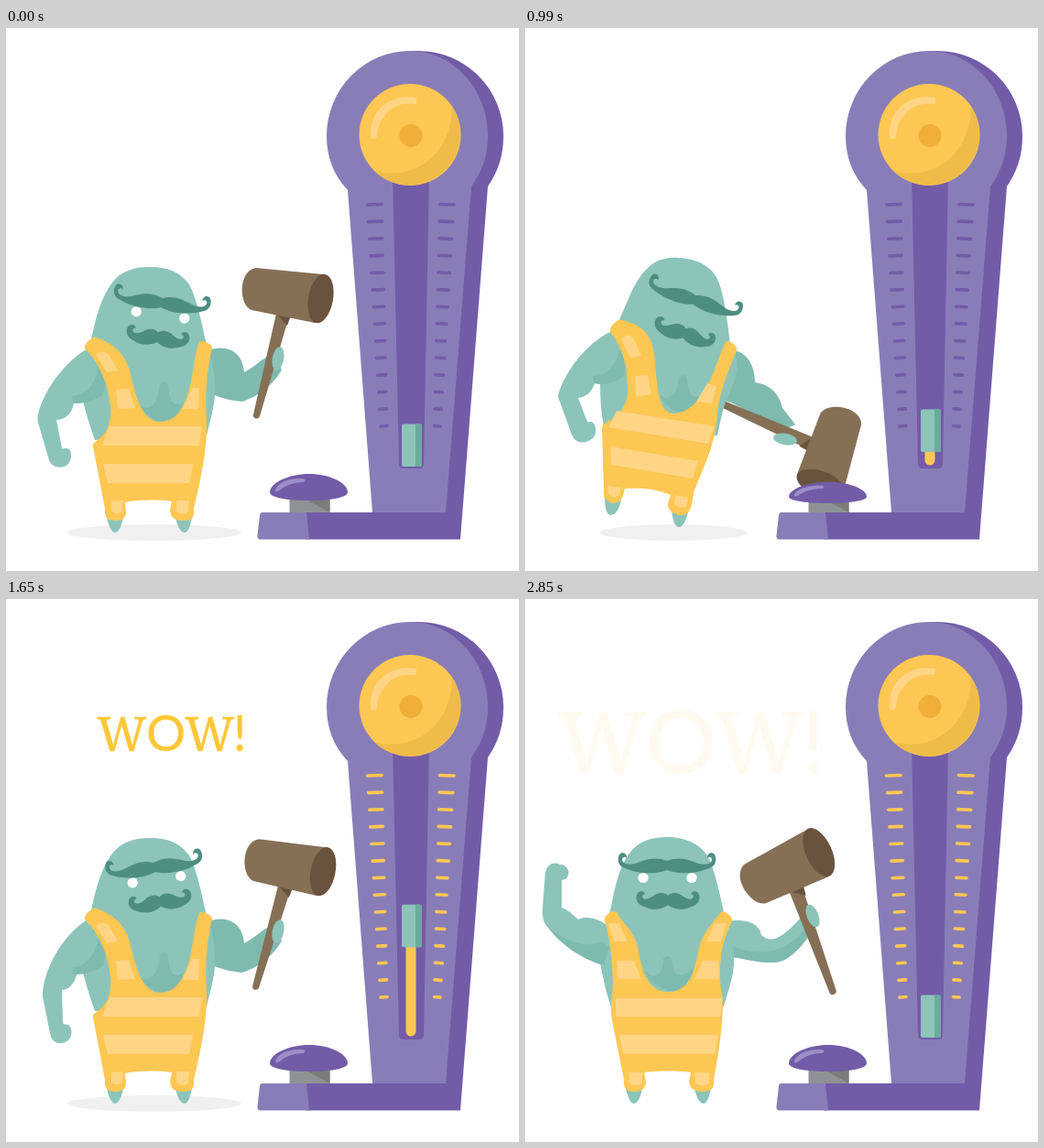
Animation, 560 px wide and 593 px high, one loop 8.21 s. Source, as an HTML page:

```html
<!DOCTYPE html>
<html lang="en">
<head>
<meta charset="utf-8">
<title>Strength tester</title>
<style>
  html, body { margin: 0; width: 100%; height: 100%; overflow: hidden; background: #fff; }
  svg { display: block; width: 100%; height: 100%; }
  .wow { font: 98px "Noto Serif", serif; text-anchor: middle; fill: #fec736; stroke: #fec736; stroke-width: .8; }
  .wow .round { font: 101px Lato, sans-serif; }
</style>
</head>
<body>
<svg viewBox="0 0 560 593">
  <defs>
    <path id="browHalf" d="M.3,-4C-12,-9 -22,-6 -32,-2C-40,1 -48,0 -49,-5C-49,-9 -45,-9 -44,-7C-43,-12 -49,-15 -52,-11C-55,-5 -53,2 -46,4C-35,9 -15,12 .3,6Z"/>
    <path id="tacheHalf" d="M.3,-4C-5,-9 -12,-7 -17,-3C-22,0 -27,1 -28,-3C-28,-5 -26,-6 -25,-5C-25,-9 -30,-10 -33,-7C-37,-1 -33,6 -26,8C-16,13 -6,11 .3,6Z"/>
  </defs>

  <ellipse id="shadow" cx="162" cy="551" rx="95" ry="9" fill="#f0f0f0"/>

  <g fill="#8cc4b9">
    <path id="feet"/>
    <path id="rightArm"/>
    <path id="rightShade" fill="#7fbaaf" d="M222,376C245,390 288,394 312,350L316,358C306,376 288,398 270,397C250,397 236,392 222,390Z"/>
    <g id="hammer">
      <path fill="#857056" d="M-7,-4L7,-1L-25,108C-26,112 -33,111 -32,106Z"/>
      <path fill="#6a533e" d="M-7,-4L9,-2L5,9Z"/>
      <path fill="#857056" d="M-29,-54L44,-47C60,-43 58,6 35,6L-34,-8C-49,-14 -48,-52 -29,-54Z"/>
      <ellipse fill="#6a533e" cx="41.500" cy="-20.500" rx="13.500" ry="27" transform="rotate(10 41.500 -20.500)"/>
    </g>
    <path id="torso"/>
    <path id="leftArm"/>
    <path id="leftShade" fill="#7fbaaf"/>
    <path id="chest" fill="#7fbaaf"/>
    <path id="overalls" fill="#fdc753"/>
    <path id="stripes" fill="#ffd585"/>
    <g id="face">
      <g id="eyes" fill="#fff"><circle cx="-26" cy="14.500" r="5.600"/><circle cx="27" cy="14.500" r="5.600"/></g>
      <g fill="#4e8e82">
        <use href="#browHalf"/><use href="#browHalf" transform="scale(-1 1)"/>
        <use href="#tacheHalf" x="1" y="38"/><use href="#tacheHalf" x="-1" y="38" transform="scale(-1 1)"/>
      </g>
    </g>
    <ellipse id="hand" rx="6.300" ry="13"/>
  </g>

  <path fill="#725ca8" d="M441,25H450A93 93 0 0 1 543,118C543,140 537,157 526,173L496,558.500H327V529H470Z"/>
  <path fill="#897db8" d="M373,177C357,160 350,140 350,118A91 93 0 0 1 441,25A85 93 0 0 1 526,118C526,140 519,158 508,173L480,529H400Z"/>
  <path fill="#897db8" d="M280,529H328L331,558.500H277Q274,558 274.500,554L277,532Q277.500,529 280,529Z"/>
  <path fill="#725ca8" d="M422,160H462L456,476Q456,481 451,481H434Q429,481 429,476Z"/>
  <g id="ticks" stroke-width="3.600" stroke-linecap="round"></g>
  <path id="bar" stroke="#fdc753" stroke-width="11" stroke-linecap="round"/>
  <g id="slider">
    <rect x="432" y="432.500" width="22" height="46.500" rx="2" fill="#8cc4b9"/>
    <path d="M447,432.500H452Q454,432.500 454,434.500V477Q454,479 452,479H447Z" fill="#6daa9d"/>
  </g>
  <g id="bell">
    <circle cx="441" cy="116.500" r="55.500" fill="#fdc753"/>
    <path fill="#efbc49" d="M487,86A55.500 55.500 0 0 1 403,157C455,167 487,130 487,86Z"/>
    <path fill="#ffd585" d="M398,119C396,90 419,71 448,76V83C428,81 418,88 413,97C407,103 406,110 405,119C403,122 398,122 398,119Z"/>
    <circle cx="442" cy="117.500" r="12.500" fill="#f0af38"/>
  </g>
  <path fill="#8f9294" d="M309.500,511H353.500V529H309.500Z"/>
  <path fill="#7b7b79" d="M326,514H353.500V529Z"/>
  <g id="cap">
    <path fill="#725ca8" d="M288,507C288,497 308,487 331,487C354,487 373,497 373,507C373,512 358,516 331,516C303,516 288,512 288,507Z"/>
    <path fill="#9c8dc7" d="M294,505C295,497 309,491 324,492Q328,493 325,496C315,496 306,499 300,504C298,506 294,508 294,505Z"/>
  </g>

  <text id="wow" class="wow" y="182"><tspan x="79">W</tspan><tspan x="170" class="round">O</tspan><tspan x="260">W</tspan><tspan x="322" class="round">!</tspan></text>
</svg>
<script>
const LOOP = 8210, END = 2850, STEP = 30;
const $ = id => document.getElementById(id);
const set = (id, attrs) => { for (const k in attrs) $(id).setAttribute(k, attrs[k]); };
const clamp = x => Math.max(0, Math.min(1, x));
const span = (t, a, b) => clamp((t - a) / (b - a));
const smooth = x => x * x * (3 - 2 * x);
const lerp = (a, b, u) => a + (b - a) * u;

// Blends two paths that share one structure.
const NUM = /-?\d+(\.\d+)?/g;
function mix(a, b, u) {
  const to = b.match(NUM);
  let i = 0;
  return a.replace(NUM, n => lerp(+n, +to[i++], u).toFixed(2));
}

// Body parts by pose; a missing pose falls back to rest.
const body = {
  feet: {
    rest: 'M110,534L128,534C126,546 122,551 119,551C116,551 112,545 110,534Z M185,534L203,534C201,546 198,551 195,551C191,551 187,545 185,534Z',
    hit: 'M87,512L105,516C102,528 98,532 93,532C89,531 87,524 87,512Z M160,526L178,529C175,540 172,545 168,545C164,545 161,538 160,526Z'
  },
  torso: {
    rest: 'M92,345C98,315 104,294 116,278C126,265 140,261 157,261C176,261 190,266 200,280C209,297 214,325 219,346C226,365 229,385 228,402C226,420 222,432 219,445L97,450C92,435 86,418 83,402C85,380 86,360 92,345Z',
    hit: 'M100,325C112,300 118,278 132,264C143,252 155,250 168,251C186,252 200,258 209,272C217,288 221,318 224,346C238,365 230,385 220,405C215,420 212,435 210,445L86,435C83,420 82,405 82,388C85,365 90,345 100,325Z',
    flex: 'M92,347C98,315 102,295 113,279C122,265 138,260 155,260C174,260 189,266 199,280C208,297 213,325 218,346C227,365 229,385 228,400C226,420 220,432 217,445L95,448C90,435 86,418 82,398C85,380 86,360 92,347Z'
  },
  chest: {
    rest: 'M145,412C158,420 166,410 168,390C169,385 176,385 177,390C178,408 184,416 194,408L188,424C178,434 160,432 145,412Z',
    hit: 'M146,400C158,410 166,400 168,383C169,378 176,378 177,383C177,400 184,408 194,400L186,414C176,424 158,422 146,400Z',
    flex: 'M124,400C145,422 150,408 151,393C152,389 159,389 160,393C161,408 166,420 188,400L180,424C168,432 144,432 124,400Z'
  },
  overalls: {
    rest: 'M86,350C84,345 96,335 99,338C121,346 130,358 135,374C141,400 148,430 168,430C188,430 198,410 203,380C206,365 207,352 211,343C213,340 226,345 225,350C219,375 217,400 219,430C220,460 212,495 205,525C206,535 203,538 194,538C184,538 180,535 179,527L181,517C165,515 146,515 130,518L131,530C130,536 126,538 119,538C110,538 107,533 108,525L95,457C93,449 116,450 114,415C113,392 102,365 86,350Z',
    hit: 'M93,332C91,326 103,316 106,319C128,324 137,335 140,350C145,375 141,421 163,421C184,420 199,395 208,370C213,358 215,350 219,343C221,339 233,347 231,352C222,375 213,395 210,420C209,455 192,485 184,508C182,524 180,532 170,532C160,531 155,525 156,519L159,510C143,503 126,502 109,503L107,511C105,517 101,519 96,519C88,517 85,512 86,505L84,437C84,428 107,430 112,400C113,375 108,350 93,332Z',
    flex: 'M87,352C85,346 97,337 101,343C106,354 119,362 123,380C128,410 136,429 156,429C178,429 185,410 190,380C195,362 207,352 213,343C216,338 228,347 226,352C214,375 211,400 214,428C219,440 213,490 206,525C207,535 203,538 194,538C184,538 180,534 179,527L181,517C165,515 146,515 130,517L132,527C132,535 127,538 119,538C110,538 107,533 108,525L95,460C92,440 96,430 96,420C95,395 93,370 87,352Z'
  },
  stripes: {
    rest: 'M113,435L214,435L211,456L105,456Z M106,476L204,476L200,497L111,497Z M98,357C104,352 110,353 113,358L122,374L110,376Z M120,395L134,394L141,415L122,416Z M203,393L211,393L210,416L193,416Z M215,360L215,360L215,360L215,360Z M115,517L128,516L127,528C123,531 118,530 115,528Z M186,516L200,516L199,529C195,532 190,531 186,528Z',
    hit: 'M100,418L207,435L200,454L91,436Z M93,457L189,473L183,492L94,477Z M105,340C110,334 115,335 119,340L127,358L115,360Z M120,380L134,379L138,400L121,403Z M199,388L209,391L204,410L187,408Z M222,360L222,360L222,360L222,360Z M91,500L105,502L102,511C99,513 94,512 91,509Z M164,510L178,513L176,523C172,525 167,524 163,520Z',
    flex: 'M99,436L216,436L213,456L99,456Z M103,476L211,476L207,497L107,497Z M91,355C95,353 100,353 103,355L112,374L97,374Z M100,395L119,395L127,415L101,415Z M194,395L211,395L212,415L185,415Z M207,354L220,354L214,374L198,374Z M113,517L128,517L128,529C124,532 118,532 114,529Z M185,517L201,517L201,529C197,532 190,532 186,529Z'
  }
};

const arms = {
  leftArm: {
    rest: 'M95,347C70,358 42,392 35,422C34,428 35,430 36,434L47,472C51,482 64,481 68,476C73,470 72,459 66,459C62,459 61,460 61,459L55,428C66,428 74,418 74,408C88,411 100,404 108,392Z',
    up: 'M95,347C65,355 38,380 28,412C26,420 26,425 26,432L25,466C25,476 32,478 40,477C50,477 53,470 51,465C49,460 46,459 46,458L48,424C58,424 67,418 71,406C86,410 100,404 108,392Z',
    hit: 'M103,328C78,335 48,365 37,398C35,403 37,405 38,408L51,444C55,454 65,454 71,450C79,446 79,434 73,430C70,430 69,431 68,430L58,404C66,403 73,398 76,388C88,390 100,384 108,376Z',
    proud: 'M95,347C70,358 47,392 41,422C40,428 40,430 40,434L48,474C50,485 58,487 64,484C72,482 74,470 68,465C64,464 63,465 62,463L61,427C70,427 77,416 78,406C88,409 100,404 108,392Z',
    flex: 'M85,400C60,392 38,376 27,361C20,354 19,348 19,340L22,300C24,288 33,287 38,290C46,290 50,298 46,304C44,307 42,306 40,307L40,337C46,339 52,344 58,350C68,345 84,350 94,360Z'
  },
  leftShade: {
    rest: 'M72,402C88,402 99,388 102,364L111,378L106,400C95,409 84,410 74,410Z',
    hit: 'M74,380C90,380 101,368 105,345L112,360L108,380C96,389 86,390 76,388Z',
    flex: 'M25,358C45,374 66,382 84,374L92,380L86,400C62,393 40,378 25,358Z'
  },
  rightArm: {
    rest: 'M220,352C240,345 258,352 260,376C272,370 280,360 290,357L301,373C294,387 277,402 258,408C246,407 232,404 222,398Z',
    up: 'M220,352C240,337 256,342 262,352C262,340 266,328 273,322L288,338C284,350 282,365 277,382C262,392 240,388 222,384Z',
    hit: 'M228,352C245,355 251,372 251,387C268,389 278,400 281,415L295,433C285,440 265,436 250,422C240,418 230,410 218,407Z',
    flex: 'M220,352C245,348 256,356 258,367C272,380 288,362 302,347L316,358C306,376 288,398 270,397C250,397 236,392 222,390Z'
  }
};

// Hammer: joint x, y, angle, scale, then hand x, y.
const grip = {
  rest: [302, 316, 0, 1, 297, 361], up: [261, 277, -36, 1, 284, 318], hit: [309, 453, 99.5, 1, 284, 449],
  proud: [304, 317, 1.5, 1, 297, 363], flex: [297, 319, -34.5, 1.05, 314, 346]
};
// Face: x, y, tilt, eye opening.
const faces = { rest: [170, 299, 8, 1], hit: [185, 296, 18, 0], proud: [162, 292, -8, 1], flex: [155, 290, 0, 1] };

const bodyKeys = [[0, 'rest'], [750, 'rest'], [960, 'hit'], [1050, 'hit'], [1380, 'proud'], [1920, 'proud'], [2160, 'flex']];
const armKeys = [[0, 'rest'], [240, 'rest'], [640, 'up'], [720, 'up'], [860, 'rest'], [960, 'hit'], [1050, 'hit'],
  [1380, 'proud'], [1920, 'proud'], [2160, 'flex']];

function poseAt(keys, t) {
  let i = 0;
  while (i < keys.length - 2 && t >= keys[i + 1][0]) i++;
  const [[t0, a], [t1, b]] = [keys[i], keys[i + 1]];
  return { a, b, u: smooth(span(t, t0, t1)) };
}
const pick = (poses, { a, b, u }) => {
  const from = poses[a] || poses.rest, to = poses[b] || poses.rest;
  return typeof from === 'string' ? mix(from, to, u) : from.map((n, k) => lerp(n, to[k], u));
};
const drawParts = (parts, pose) => { for (const id in parts) set(id, { d: pick(parts[id], pose) }); };

const COUNT = 14, RISE = 258;
for (let i = 0; i < COUNT; i++) {
  const k = i / (COUNT - 1), y = lerp(192.5, 434.5, k);
  const line = document.createElementNS('http://www.w3.org/2000/svg', 'path');
  line.setAttribute('d', `M${lerp(394.5, 409, k)},${y + .5}L${lerp(410, 416, k)},${y}` +
    `M${lerp(473.5, 467.5, k)},${y}L${lerp(489, 474, k)},${y + .5}`);
  $('ticks').append(line);
}

function drawMan(t) {
  const pose = poseAt(bodyKeys, t), arm = poseAt(armKeys, t);
  drawParts(body, pose);
  drawParts(arms, arm);

  const flex = arm.b === 'flex' ? arm.u : 0;
  const rgb = [[127, 140], [186, 196], [175, 185]].map(([a, b]) => Math.round(lerp(a, b, flex)));
  set('rightArm', { fill: `rgb(${rgb})` });
  set('rightShade', { opacity: flex > .9 ? 1 : 0 });

  const [x, y, turn, size, hx, hy] = pick(grip, arm);
  set('hammer', { transform: `translate(${x} ${y}) rotate(${turn}) scale(${size})` });
  set('hand', { transform: `translate(${hx} ${hy}) rotate(${turn * .9 + 10})` });

  const [fx, fy, tilt, open] = pick(faces, pose);
  set('face', { transform: `translate(${fx} ${fy}) rotate(${tilt})` });
  set('eyes', { opacity: open > .4 ? 1 : 0 });

  const lean = pick({ rest: [0], hit: [1] }, pose)[0];
  set('shadow', { rx: 95 - 15 * lean, opacity: t < 2730 ? 1 : 0 });
}

function drawMachine(t) {
  const climb = RISE * span(t, 970, 1290);
  const rise = t < 1320 ? climb : RISE * (1 - span(t, 1320, 1740) ** 2);
  set('slider', { transform: `translate(0 ${-rise})` });
  set('bar', { d: `M442,${Math.min(472, 470 - rise)}V472`, opacity: rise > 1 ? 1 : 0 });

  [...$('ticks').children].forEach((line, i) => {
    const lit = climb >= 50 + 16 * (COUNT - 1 - i);
    line.setAttribute('stroke', lit ? '#fdc753' : '#725ca8');
  });

  set('bell', { transform: `translate(0 ${-5 * Math.sin(Math.PI * span(t, 1280, 1430))})` });

  const press = span(t, 940, 980) - smooth(span(t, 1060, 1260));
  set('cap', { transform: `translate(0 ${516 + 3 * press}) scale(1 ${1 - .2 * press}) translate(0 -516)` });
}

function drawWow(t) {
  const pop = span(t, 1590, 1860), u = span(t, 1920, END);
  const sink = u ** .63;
  const grow = (1 - (1 - pop) ** 3) * (1 + .012 * Math.sin(Math.PI * span(t, 1740, 1920)));
  set('wow', {
    opacity: pop ? 1 - .93 * u ** 1.4 : 0,
    transform: `translate(180 ${147 + 10 * sink}) scale(${grow * (1 - .05 * sink)}) translate(-180 -147)`
  });
}

function draw(ms) {
  const t = Math.min(END, Math.floor(ms / STEP) * STEP);
  drawMan(t);
  drawMachine(t);
  drawWow(t);
}

const start = performance.now();
function frame() {
  draw((performance.now() - start) % LOOP);
  requestAnimationFrame(frame);
}
frame();
</script>
</body>
</html>
```
